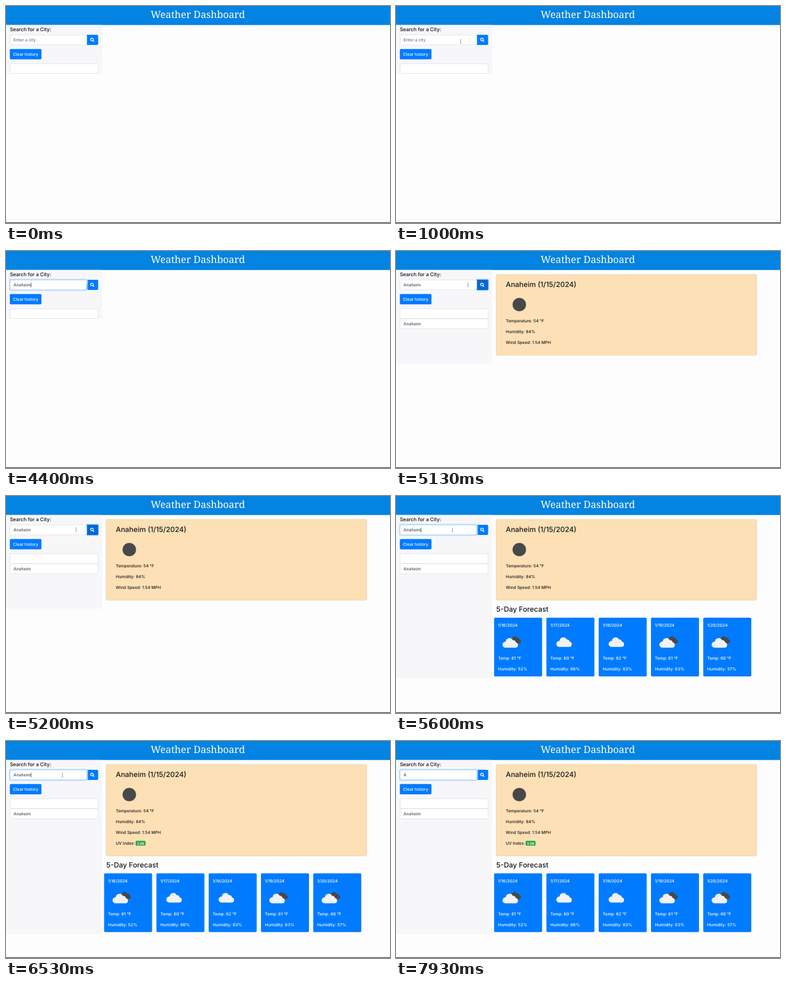
These frames come from a looping animation (640 by 362 pixels, 8 s). An HTML page:

```html
<!DOCTYPE html>
<html lang="en">
<head>
<meta charset="utf-8">
<title>Weather Dashboard</title>
<style>
  html, body { margin: 0; width: 100%; height: 100%; overflow: hidden; background: #fdfdfd; }
  svg { display: block; width: 100%; height: 100%; }
  text { font: 450 6.9px Inter, "Liberation Sans", sans-serif; fill: #16191c; white-space: pre; text-rendering: geometricPrecision; }
  .head { font: 16.5px "Noto Serif", serif; fill: #fff; }
  .label { font-size: 8.3px; font-weight: 550; fill: #111; }
  .title { font-size: 11.9px; font-weight: 500; }
  .white { fill: #fff; }
  .field { fill: #fff; stroke: #d3d7dc; stroke-width: .6; }
  .gray { fill: #495057; }
</style>
</head>
<body>
<svg viewBox="0 0 640 362">
  <rect width="640" height="31.7" fill="#0383e2"/>
  <text class="head" x="319.7" y="20.4" text-anchor="middle">Weather Dashboard</text>
  <rect id="panel" y="31.7" width="160" fill="#f7f7fa"/>
  <text class="label" x="6.5" y="42.2">Search for a City:</text>

  <rect id="btnRing" x="133.4" y="46.6" width="21.4" height="19.6" rx="2.4" fill="#8fc4ff"/>
  <path d="M134.6 47.9h17a2 2 0 0 1 2 2v13.2a2 2 0 0 1-2 2h-17z" id="btn"/>
  <g fill="none" stroke="#fff" stroke-width="1.2" stroke-linecap="round">
    <circle cx="143.2" cy="55.8" r="2.2"/><path d="M144.9 57.5l1.8 1.8"/>
  </g>
  <rect id="ring" x="5.8" y="47.4" width="129.8" height="18.2" rx="2.4" fill="none" stroke="#bfdeff" stroke-width="1.6"/>
  <rect id="input" class="field" x="6.8" y="48.3" width="127.9" height="16.5" rx="1.6"/>
  <text id="typed" x="12.5" y="59"></text>
  <path id="caret" d="M0 53v7.6" stroke="#222" stroke-width=".7"/>

  <rect x="6.4" y="71.7" width="52.7" height="17.4" rx="1.8" fill="#007bff"/>
  <text class="white" x="32.8" y="83" text-anchor="middle">Clear history</text>
  <rect class="field" x="6.8" y="96.3" width="146.6" height="16.3" rx="1.6"/>
  <g id="history">
    <rect class="field" x="6.8" y="113" width="146.6" height="16.8" rx="1.6"/>
    <text class="gray" x="12.5" y="124">Anaheim</text>
  </g>

  <g id="today">
    <rect id="card" x="167" y="39.2" width="434" rx="1.8" fill="#fde0b5" stroke="#e3c89d" stroke-width=".6"/>
    <text class="title" x="183" y="60.2">Anaheim (1/15/2024)</text>
    <circle cx="205.5" cy="89.4" r="11.2" fill="#48484a"/>
    <text x="183" y="119.3">Temperature: 54 °F</text>
    <text x="183" y="137.1">Humidity: 84%</text>
    <text x="183" y="154.9">Wind Speed: 1.54 MPH</text>
    <g id="uv">
      <text x="183" y="172.7">UV Index:</text>
      <rect x="216" y="166.4" width="16.6" height="8.2" rx="1.6" fill="#28a745"/>
      <text class="white" x="224.3" y="172.5" text-anchor="middle" style="font-size:5.3px;font-weight:700">3.09</text>
    </g>
  </g>
  <g id="forecast"><text class="title" x="167" y="193">5-Day Forecast</text></g>

  <g id="mouse">
    <path id="beam" d="M-1.2-3.2Q0-3.2 0-2.4Q0-3.2 1.2-3.2M0-2.4V2.4M-1.2 3.2Q0 3.2 0 2.4Q0 3.2 1.2 3.2M-.7 .8h1.4" fill="none" stroke="#777" stroke-width=".6"/>
    <path id="hand" d="M-1-3q.9-1 1.8 0v2.6l3 .8v2.4l-1 2.2h-3.6l-2.2-3.2q.6-1.2 2 0z" fill="#fff" stroke="#222" stroke-width=".5"/>
    <path id="arrow" d="M0 0v7.4l1.8-1.6 1.2 2.6 1-.5-1.1-2.5h2.4z" fill="#111" stroke="#fff" stroke-width=".5"/>
  </g>
  <rect y="361" width="640" height="1" fill="#2b2d30"/>
</svg>
<script>
const $ = id => document.getElementById(id);
const show = (id, on) => $(id).setAttribute('visibility', on ? 'inherit' : 'hidden');
const set = (id, name, value) => $(id).setAttribute(name, value);

const cloud = (x, y, scale, color) => `<path transform="translate(${x} ${y}) scale(${scale})" fill="${color}"
  d="M5 17H21.5A4.4 4.4 0 0 0 22.6 8.3A4.2 4.2 0 0 0 17.6 4.6A6.2 6.2 0 0 0 5.8 7A5 5 0 0 0 5 17z"/>`;

// temperature, humidity, broken clouds
const days = [[61, 52, 1], [60, 66, 0], [62, 63, 0], [61, 63, 1], [60, 57, 1]];
$('forecast').innerHTML += days.map(([temp, hum, broken], i) => `
  <g transform="translate(${163.5 + i * 87.15} 203)">
    <rect width="80" height="98" rx="1.8" fill="#007bff"/>
    <text class="white" x="6.6" y="15.2">1/${16 + i}/2024</text>
    ${broken ? cloud(25.5, 30.3, .74, '#48484a') + cloud(13.6, 33, 1, '#f2f2f2') : cloud(16.2, 31.8, 1, '#f2f2f2')}
    <text class="white" x="6.6" y="70.2">Temp: ${temp} °F</text>
    <text class="white" x="6.6" y="88">Humidity: ${hum}%</text>
  </g>`).join('');

const city = 'Anaheim';
const keys = [2800, 3060, 3460, 3660, 3800, 3860, 4000];
const FOCUS = 1600, CLICK = 4730, TODAY = 5060, FORECAST = 5330, REFOCUS = 5470, UV = 5800, ERASE = 7460;
const path = [[60, 114, 84], [860, 110, 60], [1200, 104, 58], [1930, 106, 64], [4400, 135, 60], [4600, 144, 58],
  [4860, 144, 57], [5200, 117, 56], [5460, 94, 57], [8000, 94, 57]];

function mouseAt(t) {
  const i = Math.max(1, path.findIndex(p => p[0] > t));
  const [a, b] = [path[i - 1], path[i]];
  const u = Math.max(0, (t - a[0]) / (b[0] - a[0])), e = u * u * (3 - 2 * u);
  // the pointer rests while the keyboard is in use
  return b[0] === 4400 && t < keys[0] ? [a[1], a[2]] : [a[1] + (b[1] - a[1]) * e, a[2] + (b[2] - a[2]) * e];
}

function draw(t) {
  const erased = t < ERASE ? 0 : Math.min(6, 1 + Math.floor((t - ERASE) / 90));
  const count = keys.filter(k => k <= t).length - erased;
  const focused = t >= FOCUS && t < CLICK || t >= REFOCUS;
  const typed = $('typed');
  typed.textContent = count ? city.slice(0, count) : 'Enter a city';
  typed.style.fill = count ? '#495057' : '#6c757d';

  // the caret restarts its blink at each focus or key press
  const last = Math.max(...[FOCUS, ...keys, REFOCUS].filter(k => k <= t));
  const blink = Math.floor((t - last) / 530) % 2 === 0 && !(t >= 7000 && t < ERASE);
  show('caret', focused && (t >= ERASE ? t < 7910 : blink));
  set('caret', 'transform', `translate(${12.8 + (count ? typed.getComputedTextLength() : 0)} 0)`);

  const since = t < CLICK ? t - FOCUS : t - REFOCUS;
  set('ring', 'opacity', focused ? Math.min(1, since / 150) : 0);
  $('input').style.stroke = focused ? '#80bdff' : '';
  const pressed = t >= CLICK && t < REFOCUS;
  show('btnRing', pressed);
  set('btn', 'fill', pressed ? '#0067d6' : '#007bff');

  show('history', t >= CLICK);
  show('today', t >= TODAY);
  show('forecast', t >= FORECAST);
  show('uv', t >= UV);
  const shift = t >= UV ? 17.8 : 0;
  set('card', 'height', 134.7 + shift);
  set('forecast', 'transform', `translate(0 ${shift})`);
  const bottom = t < CLICK ? 113 : t < TODAY ? 130 : t < FORECAST ? 188 : 304 + shift;
  set('panel', 'height', bottom - 31.7);

  const [x, y] = mouseAt(t);
  const kind = y > 66 ? 'arrow' : x > 135.5 ? 'hand' : 'beam';
  set('mouse', 'transform', `translate(${x} ${y})`);
  show('mouse', t >= 60 && t < keys[0] || t >= 4400 && t < ERASE);
  for (const k of ['arrow', 'hand', 'beam']) show(k, k === kind);
}

function frame(now) {
  draw(now % 8000);
  requestAnimationFrame(frame);
}
draw(0);
requestAnimationFrame(frame);
</script>
</body>
</html>
```
